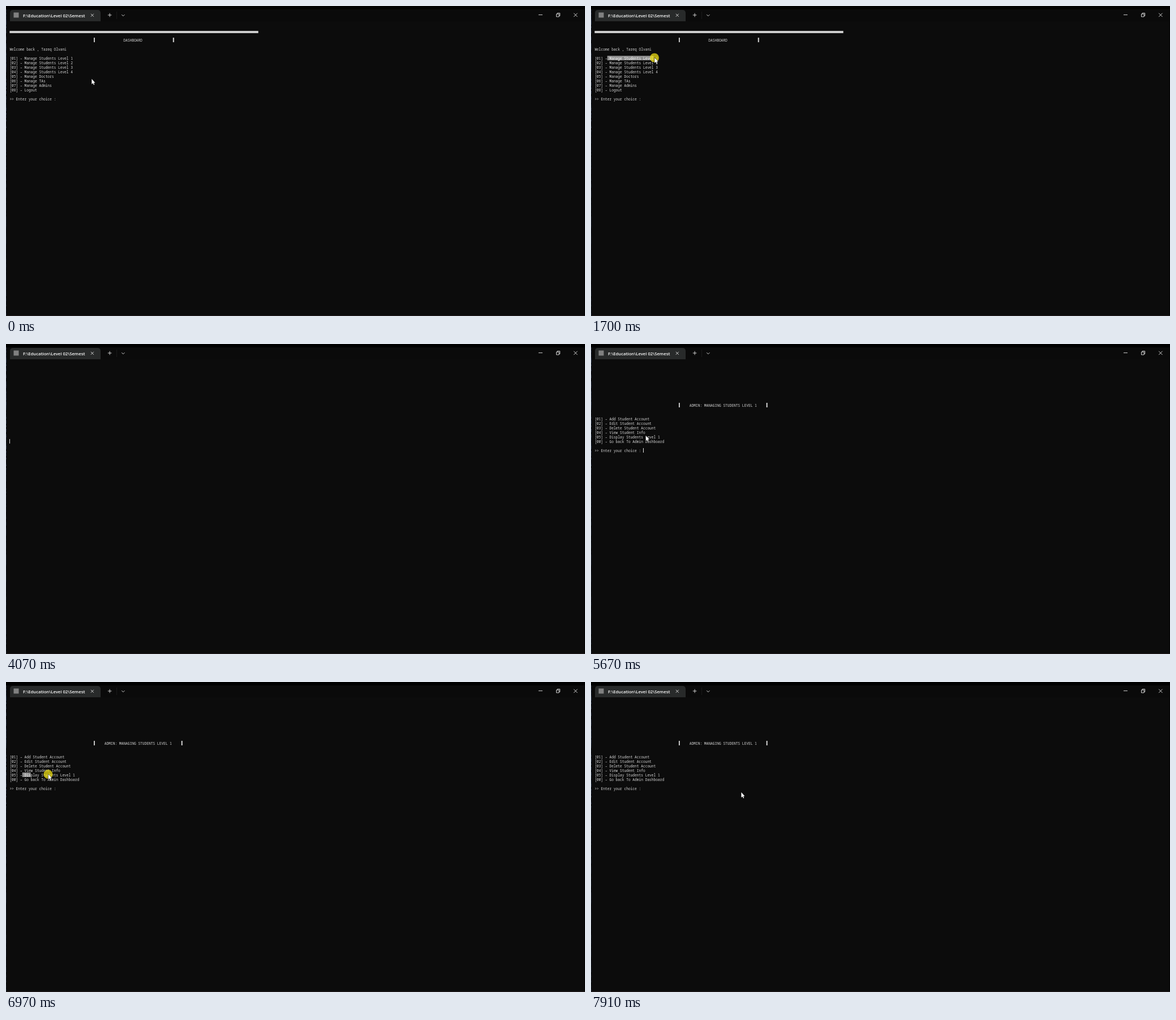
An HTML page with a canvas that plays this animation: 1022 px wide and 548 px high, repeating every 8 s.

```html
<!DOCTYPE html>
<html lang="en">
<head>
<meta charset="utf-8">
<title>Console menu</title>
<style>
  html, body { margin: 0; width: 100%; height: 100%; overflow: hidden; background: #0c0c0c; }
  canvas { display: block; }
</style>
</head>
<body>
<canvas id="stage" width="1022" height="548"></canvas>
<script>
const ctx = document.getElementById('stage').getContext('2d');
const LOOP = 8000, TYPED = 3670, CLEARED = 4070, REDRAWN = 4100, POINTER_BACK = 5180;
const BLINK = 1060, BLINK_ON = 520;
const CELL = 3.72, ROW = 8, LEFT = 6.4;   // terminal grid
const INK = '#d6d6d6', BRIGHT = '#e4e4e4';
const SELECT_COL = 6, SELECT_LAG = 75, CLICK = 100;

const numbered = (labels, digit) => labels.map((label, i) => `[0${digit(i)}] – ${label}`);

// Row 0 is centred at y = 60; an empty string leaves a blank row
const dashboard = {
  title: 'DASHBOARD', titleRow: 0, titleCol: 54, lastCol: 77, rule: true, blinkStart: 10,
  rows: ['', '', 'Welcome back , Tareq Olvani', '',
    ...numbered([...[1, 2, 3, 4].map(n => `Manage Students Level ${n}`),
      'Manage Doctors', 'Manage TAs', 'Manage Admins', 'Logout'], i => i + 1),
    '', '>> Enter your choice : '],
};
const levelMenu = {
  title: 'ADMIN: MANAGING STUDENTS LEVEL 1', titleRow: 6, titleCol: 45, lastCol: 81, blinkStart: 4110,
  rows: [...Array(9).fill(''),
    ...numbered(['Add Student Account', 'Edit Student Account', 'Delete Student Account',
      'View Student Info', 'Display Students Level 1', 'Go back To Admin Dashboard'], i => (i + 1) % 6),
    '', '>> Enter your choice : '],
};

const moves = [
  { from: 200, to: 1000, x: 32, y: 90 },
  { from: 1330, to: 1680, x: 112, y: 91.5 },
  { from: 1690, to: 2040, x: 118, y: 92 },
  { from: 2130, to: 2490, x: 198, y: 152.5 },
  { from: 5100, to: 5670, x: 96.5, y: 162 },
  { from: 5670, to: 6110, x: 32, y: 162 },
  { from: 6840, to: 7130, x: 131, y: 164.5 },
  { from: 7340, to: 7760, x: 265, y: 195 },
];
const drags = [
  { press: 1310, release: 2130, clear: 2750, row: 4 },
  { press: 6830, release: 7340, clear: 7810, row: 13 },
];

const colX = col => LEFT + col * CELL;
const rowY = row => 60 + row * ROW;
const smooth = u => u * u * (3 - 2 * u);

function rect(x, y, w, h, color) {
  ctx.fillStyle = color;
  ctx.fillRect(x, y, w, h);
}

// Lay text out large and scale it down so advances stay fractional
function text(str, x, y, size, weight, family, color) {
  ctx.save();
  ctx.translate(x, y);
  ctx.scale(0.1, 0.1);
  ctx.font = `${weight} ${size * 10}px ${family}`;
  ctx.fillStyle = color;
  ctx.fillText(str, 0, 0);
  ctx.restore();
}

function write(row, col, str, color = INK) {
  text(str, colX(col), rowY(row) + 2.6, 6.2, 500, '"Noto Sans Mono", monospace', color);
}

// Block that fills a row's height
const block = (x, row, width, color = BRIGHT) => rect(x, rowY(row) - ROW / 2, width, ROW, color);

function drawWindow() {
  rect(0, 0, 1022, 548, '#0c0c0c');
  rect(0, 0, 1022, 6, '#000');
  rect(0, 6, 1022, 21, '#0a0a0a');
  rect(1020.5, 6, 1.5, 542, '#050505');
  rect(0, 547, 1022, 1, '#241d1f');

  // Sliver of desktop along the left edge
  for (let y = 6; y < 547; y += 3) {
    const fleck = Math.abs(Math.sin(y * 12.9898) * 43758.5453) % 1;
    const glow = 16 + fleck * (y < 220 ? 60 : 26);
    rect(0, y, 1, 3, `rgb(${glow * 0.65},${glow * 0.8},${glow * 1.1})`);
  }

  ctx.fillStyle = '#282a2a';
  ctx.beginPath();
  ctx.roundRect(7, 7, 160, 20, [5, 5, 0, 0]);
  ctx.fill();
  rect(13.5, 11.5, 9, 9, '#808080');
  text('F:\\Education\\Level 02\\Semest', 30, 19.8, 7.7, 600, '"Open Sans", sans-serif', '#fff');
  rect(195, 10, 1, 13, '#191919');

  ctx.strokeStyle = BRIGHT;
  ctx.lineWidth = 0.9;
  ctx.stroke(new Path2D(`
    M149.8 13.8l5 5m0-5l-5 5  M179.8 16h6.6m-3.3-3.3v6.6  M204.2 15.2l2.6 2.6 2.6-2.6
    M940 15.6h7  M971.5 14.2h4.6v4.8h-4.6z M973 14v-1.4h4.7v4.9h-1.4
    M1002.2 12.7l6.4 6.4m0-6.4l-6.4 6.4`));
}

function pointerAt(t) {
  let x = 151, y = 129;
  for (const move of moves) {
    if (t < move.from) break;
    const k = smooth(Math.min(1, (t - move.from) / (move.to - move.from)));
    x += (move.x - x) * k;
    y += (move.y - y) * k;
  }
  return { x, y };
}

function drawSelection(t, rows) {
  const drag = drags.find(d => t >= d.press && t < d.clear);
  if (!drag) return;
  const { x } = pointerAt(Math.min(t - SELECT_LAG, drag.release));
  if (x < 33) return;
  const end = Math.floor((x - LEFT) / CELL) + 1;
  block(colX(SELECT_COL), drag.row, (end - SELECT_COL) * CELL, '#8d8d8d');
  write(drag.row, SELECT_COL, rows[drag.row].slice(SELECT_COL, end), '#fff');
}

function drawScreen(t, { title, titleRow, titleCol, lastCol, rule, blinkStart, rows }) {
  if (rule) rect(LEFT, 44, 118 * CELL, 4, '#cccccc');
  block(155, titleRow, 1.7);
  block(colX(lastCol + 0.5), titleRow, CELL / 2);
  write(titleRow, titleCol, title);
  rows.forEach((str, row) => write(row, 0, str));
  drawSelection(t, rows);

  const promptRow = rows.length - 1;
  let caretCol = rows[promptRow].length;
  if (t >= TYPED && t < CLEARED) write(promptRow, caretCol++, '1');
  if (t >= blinkStart && (t - blinkStart) % BLINK < BLINK_ON) block(Math.round(colX(caretCol)), promptRow, 1);
}

function drawPointer(t) {
  if (t >= TYPED && t < POINTER_BACK) return;   // hidden while typing
  const { x, y } = pointerAt(t);
  const pressed = drags.some(d => (t >= d.press && t < d.release) || (t >= d.clear && t < d.clear + CLICK));
  ctx.save();
  ctx.translate(x, y);
  if (pressed) {
    ctx.fillStyle = 'rgba(232,218,20,.76)';
    ctx.beginPath();
    ctx.arc(0, 0, 8, 0, 7);
    ctx.fill();
  }
  const arrow = new Path2D('M.3 0V9.2L2.4 7.3 3.9 10.6 5.2 10 3.8 6.8H6.4Z');
  ctx.strokeStyle = '#111';
  ctx.lineWidth = 0.9;
  ctx.stroke(arrow);
  ctx.fillStyle = '#fff';
  ctx.fill(arrow);
  ctx.restore();
}

function frame() {
  const t = performance.now() % LOOP;
  drawWindow();
  if (t >= CLEARED && t < REDRAWN) block(6, 14, 1);   // console just cleared
  else drawScreen(t, t < CLEARED ? dashboard : levelMenu);
  drawPointer(t);
  requestAnimationFrame(frame);
}
frame();
</script>
</body>
</html>
```
